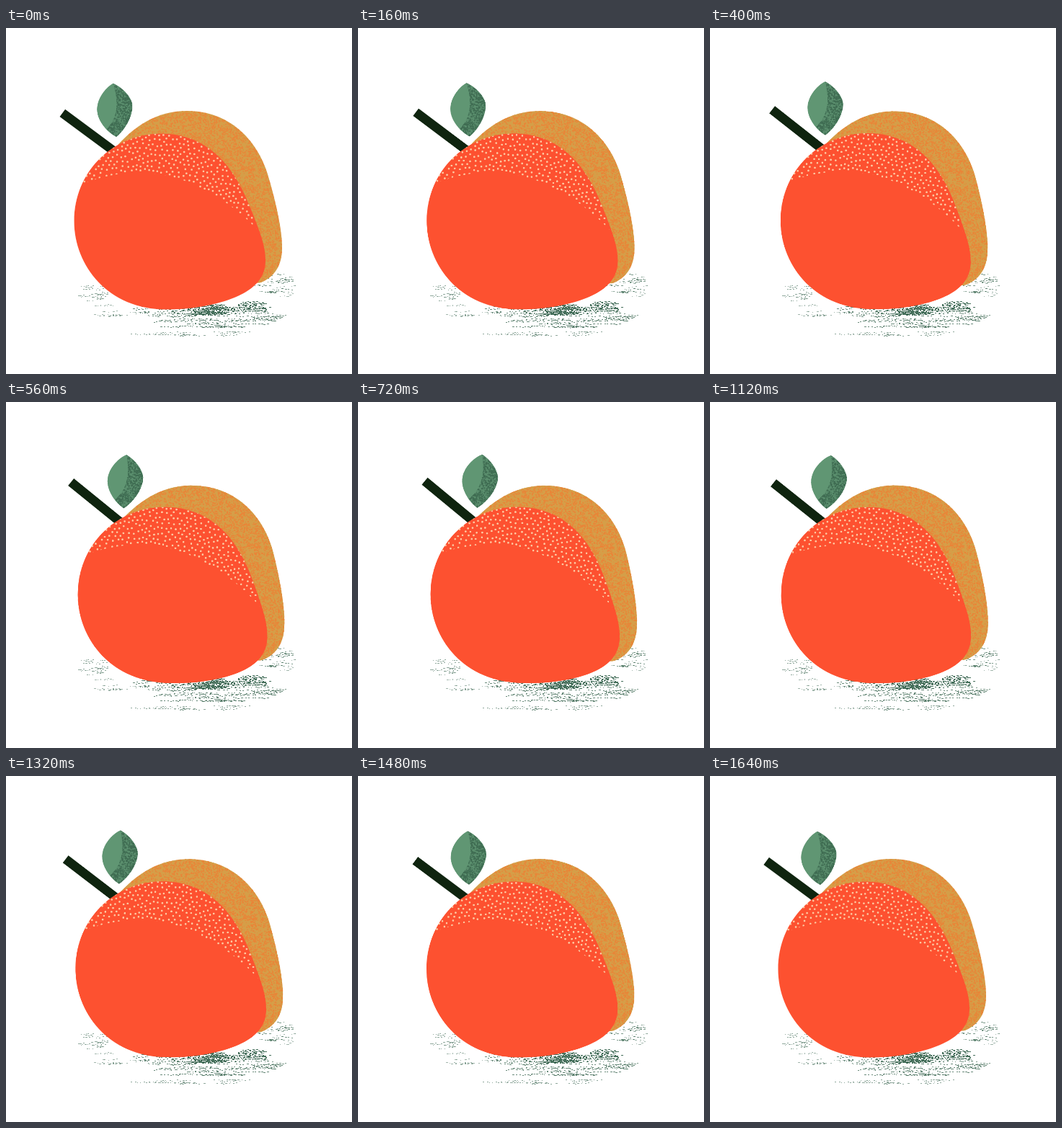
Recreate the animation shown at these times as an HTML page with a canvas. Size 480x480 px, loop 1680 ms.

```html
<!DOCTYPE html>
<html lang="en">
<head>
<meta charset="utf-8">
<title>Swaying fruit</title>
<style>
  html, body { margin: 0; width: 100%; height: 100%; overflow: hidden; background: #fff; }
  canvas { display: block; width: 480px; height: 480px; }
</style>
</head>
<body>
<canvas id="stage" width="480" height="480"></canvas>
<script>
const SIZE = 480, LOOP = 1680, STEP = 40;
const PIVOT = { x: 238, y: 380 };
const LEAF_BASE = { x: 153, y: 151 };
const SWAY = 0.055, LEAF_SWAY = 0.125;
const LEAD = 45, LEAF_LAG = 110;

const RED = '#fd5130', GOLD = '#d59e48', ORANGE = '#e98538', PEACH = '#fdc8a0';
const LEAF = '#609673', LEAF_DARK = '#3f6c52', STEM = '#0f240f', SHADOW = '#456f5b';

const front = new Path2D(`M94.5 268 C94.5 200 147 147 215 146.5 C283 147 318 195 340 252
  C349 275 360 300 360 322 C360 352 337 368 303 379 C277 387 250 390.5 222 390.5
  C142 390.5 94.5 330 94.5 268Z`);
const back = new Path2D(`M150 168 C178 135 210 115 251 115 C310 115 348 155 363 203
  C371 230 383 275 383 305 C383 330 372 345 354 353 L300 360 L200 250Z`);
const stippled = new Path2D(`M90 222 L105 217 C160 194 225 193 285 230
  C310 244 330 260 350 281 L380 281 L380 120 L90 120Z`);
const leaf = new Path2D(`M148 77 C140 81 126 96 126 113 C126 130 142 146 153 151
  C163 143 175 125 175 108 C175 97 161 82 148 77Z`);
const leafShade = new Path2D('M148 77 C156 100 156 124 139 141 L153 152 L180 140 L180 80Z');

let seed = 7;
function random() {
  seed = (Math.imul(seed, 1664525) + 1013904223) >>> 0;
  return seed / 4294967296;
}
const between = (a, b) => a + (b - a) * random();

// Layers are painted once at double resolution, then only moved.
function layer(paint) {
  const canvas = document.createElement('canvas');
  canvas.width = canvas.height = SIZE * 2;
  const g = canvas.getContext('2d');
  g.scale(2, 2);
  paint(g);
  return canvas;
}

function fill(g, path, color) {
  g.fillStyle = color;
  g.fill(path);
}

function grain(g, color, count, x, y, w, h) {
  g.fillStyle = color;
  for (let i = 0; i < count; i++) {
    g.fillRect(between(x, x + w), between(y, y + h), between(0.8, 2.2), between(0.8, 2.2));
  }
}

function clipped(g, paths, paint) {
  g.save();
  paths.forEach(path => g.clip(path));
  paint();
  g.restore();
}

function stipple(g) {
  const dots = [];
  g.fillStyle = PEACH;
  for (let i = 0; i < 30000; i++) {
    const x = between(95, 352), y = between(145, 284);
    if (dots.some(d => Math.hypot(d.x - x, d.y - y) < 5.3)) continue;
    dots.push({ x, y });
    g.beginPath();
    g.arc(x, y, 1.3, 0, Math.PI * 2);
    g.fill();
  }
}

// A patch of dry-brush strokes, thinning out towards its rim.
function brush(g, cx, cy, rx, ry, strokes, alpha = 1) {
  g.globalAlpha = alpha;
  for (let i = 0; i < strokes; i++) {
    const v = between(-1, 1);
    const y = Math.round(cy + v * ry);
    const reach = rx * Math.sqrt(1 - v * v);
    const length = between(0.2, 0.7) * rx;
    const start = cx + between(-reach, reach) - length / 2;
    for (let x = start; x < start + length; x += between(2, 7)) {
      g.fillRect(Math.round(x), y + Math.round(between(-0.7, 0.7)), Math.ceil(between(0.2, 2.6)), 1);
    }
  }
}

const shadowLayer = layer(g => {
  g.fillStyle = SHADOW;
  brush(g, 280, 391, 48, 7, 64);
  brush(g, 286, 393, 22, 6, 46);
  brush(g, 344, 385, 18, 6, 46);
  brush(g, 295, 400, 78, 12, 38, 0.8);
  brush(g, 212, 393, 34, 8, 24, 0.8);
  brush(g, 345, 400, 38, 9, 14, 0.7);
  brush(g, 277, 414, 56, 1, 10, 0.8);
  brush(g, 270, 423, 80, 3, 8, 0.6);
  brush(g, 120, 366, 20, 13, 24, 0.6);
  brush(g, 152, 390, 38, 10, 9, 0.5);
  brush(g, 371, 353, 25, 14, 28, 0.7);
  brush(g, 390, 366, 22, 14, 8, 0.5);
});

const fruitLayer = layer(g => {
  fill(g, back, GOLD);
  clipped(g, [back], () => grain(g, ORANGE, 12500, 148, 113, 238, 244));
  g.strokeStyle = STEM;
  g.lineWidth = 12.7;
  g.beginPath();
  g.moveTo(78.2, 118);
  g.lineTo(153, 173.3);
  g.stroke();
  fill(g, front, RED);
  clipped(g, [front, stippled], () => stipple(g));
});

const leafLayer = layer(g => {
  fill(g, leaf, LEAF);
  clipped(g, [leaf, leafShade], () => {
    fill(g, leafShade, '#5a8e6d');
    grain(g, LEAF_DARK, 1150, 136, 75, 42, 78);
  });
});

const stage = document.getElementById('stage').getContext('2d');

const wave = t => (1 - Math.cos(2 * Math.PI * t / LOOP)) / 2;

function rotateAbout(point, angle) {
  stage.translate(point.x, point.y);
  stage.rotate(angle);
  stage.translate(-point.x, -point.y);
}

const place = image => stage.drawImage(image, 0, 0, SIZE, SIZE);

function draw(now) {
  const t = Math.floor((now % LOOP) / STEP) * STEP;
  stage.fillStyle = '#fff';
  stage.fillRect(0, 0, SIZE, SIZE);
  place(shadowLayer);
  stage.save();
  rotateAbout(PIVOT, SWAY * wave(t + LEAD));
  place(fruitLayer);
  rotateAbout(LEAF_BASE, LEAF_SWAY * wave(t - LEAF_LAG));
  place(leafLayer);
  stage.restore();
}

let began;
function tick(now) {
  began ??= now;
  draw(now - began);
  requestAnimationFrame(tick);
}
draw(0);
requestAnimationFrame(tick);
</script>
</body>
</html>
```
